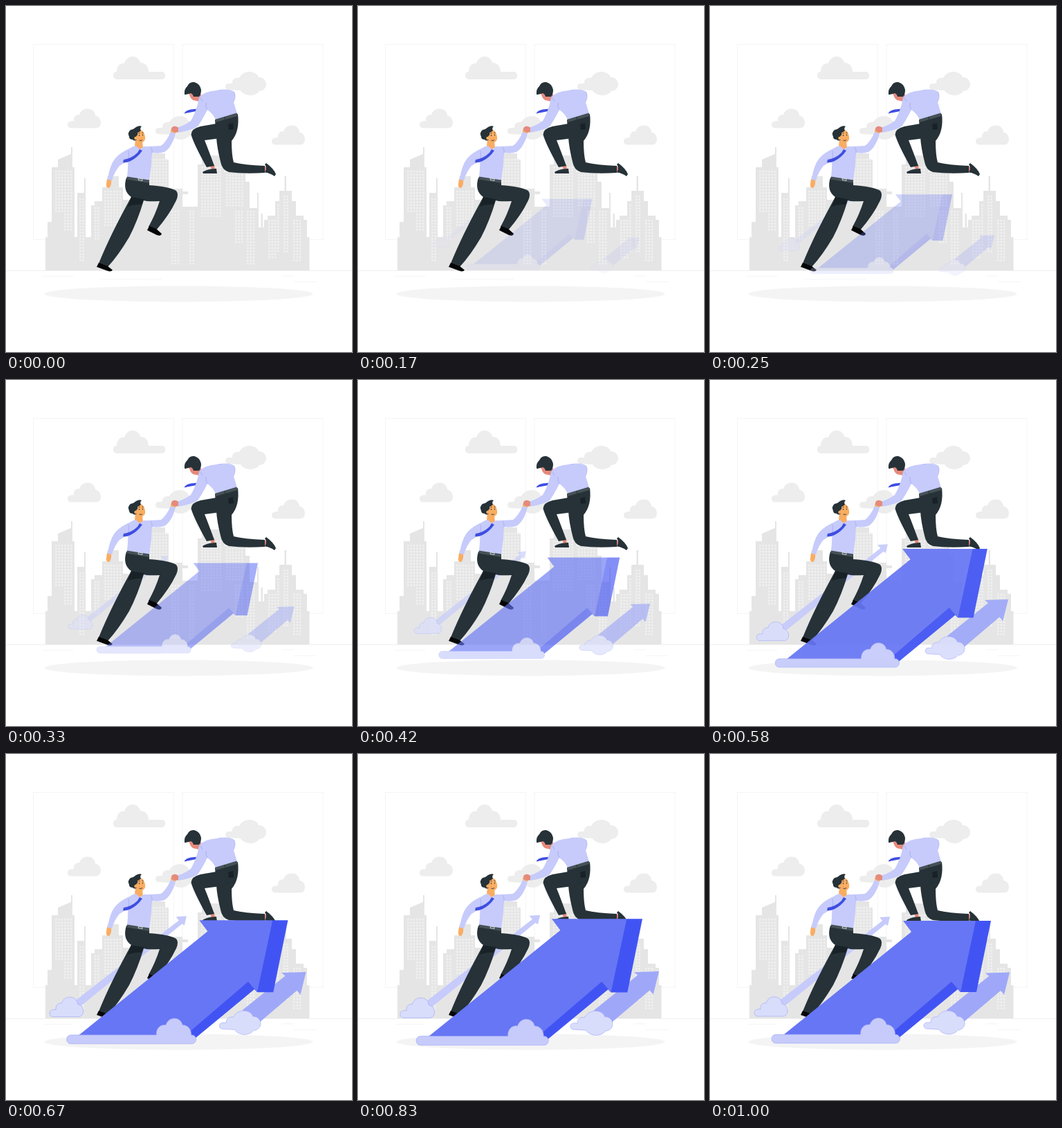
These frames come from a looping animation (500x500 px, 1040 ms). An HTML page with a canvas:

```html
<!DOCTYPE html>
<html lang="en">
<head>
<meta charset="utf-8">
<title>Helping hand</title>
<style>
html, body { margin: 0; width: 100%; height: 100%; overflow: hidden; background: #fff; }
canvas { display: block; width: 100vw; height: 100vh; }
</style>
</head>
<body>
<canvas id="stage" width="500" height="500"></canvas>
<script>
const SIZE = 500, LOOP = 1040, FPS = 24;
const SKIN = "#f9ad62", ROSE = "#e58a7b", DARK = "#263238", SHADE = "#182126";
const BLACK = "#050607", BELT = "#465157", SHIRT = "#c6cbfb", TIE = "#3f4ee0";
const FOLD = "#969ff0", EDGE = "#9aa5f8", MIST = "#d9ddfc", GREY = "#ededed";
const FRONT = "#6776f4", SIDE = "#4154f3", PALE = "#9fa8f8";

const stage = document.getElementById("stage").getContext("2d");
const sheet = document.createElement("canvas");
sheet.width = sheet.height = SIZE;
const layer = sheet.getContext("2d");
let c = stage;

// Each step is a line [x, y], a quadratic or a cubic curve
function trace(x, y, steps) {
  c.beginPath();
  c.moveTo(x, y);
  for (const s of steps) {
    if (s.length === 2) c.lineTo(...s);
    else if (s.length === 4) c.quadraticCurveTo(...s);
    else c.bezierCurveTo(...s);
  }
}

function shape(fill, x, y, ...steps) {
  trace(x, y, steps);
  c.closePath();
  c.fillStyle = fill;
  c.fill();
}

function line(color, width, x, y, ...steps) {
  trace(x, y, steps);
  c.strokeStyle = color;
  c.lineWidth = width;
  c.stroke();
}

function oval(fill, x, y, rx, ry) {
  c.beginPath();
  c.ellipse(x, y, rx, ry, 0, 0, Math.PI * 2);
  c.fillStyle = fill;
  c.fill();
}

function edge(color) {
  c.strokeStyle = color;
  c.lineWidth = .6;
  c.stroke();
}

function at(x, y, paint) {
  c.save();
  c.translate(x, y);
  paint();
  c.restore();
}

function smallCloud(x, y, fill, rim) {
  at(x, y, () => {
    shape(fill, 5, 28, [-1.7, 28, -1.7, 18, 5, 18], [7, 17, 9, 18],
      [8, 11, 13, 8, 17, 9], [19, 2, 24, 0, 29, 0], [36, 0, 40, 5, 40, 10],
      [45, 11, 48, 15, 48, 20], [48, 25, 45, 28, 41, 28]);
    if (rim) edge(rim);
  });
}

function largeCloud(x, y, fill, rim) {
  at(x, y, () => {
    shape(fill, 4.5, 26, [-1.5, 26, -1.5, 17, 4.5, 17], [10, 17],
      [9, 11, 15, 8, 20, 9], [23, 3, 29, 0, 35, 0], [42, 0, 47, 4, 48, 8],
      [55, 8, 59, 13, 59, 18], [59, 24, 54, 28, 49, 28],
      [46, 32, 41, 34, 36, 34], [30, 34, 24, 31, 22, 27]);
    if (rim) edge(rim);
  });
}

function backdrop() {
  c.strokeStyle = "#f3f3f3";
  c.lineWidth = .8;
  c.strokeRect(39.5, 55.5, 203, 282);
  c.strokeRect(255, 55.5, 203, 282);
  line("#ebebeb", .8, 0, 382.5, [500, 382.5]);
  line("#f3f3f3", .8, 53, 390.5, [97, 390.5]);
  line("#f3f3f3", .8, 136, 395, [225, 395]);
  line("#f3f3f3", .8, 399, 390, [416, 390]);
  line("#f3f3f3", .8, 416, 398.5, [448, 398.5]);
  oval("#f4f4f4", 249.5, 416, 194, 11.5);

  shape(GREY, 161, 106, [153, 106, 153, 95, 160, 95], [160, 87, 165, 82, 171, 83],
    [173, 76, 178, 73, 183, 73], [189, 73, 193, 77, 194, 82],
    [201, 82, 206, 87, 206, 95], [225, 95], [232, 95, 232, 106, 225, 106]);
  smallCloud(89, 148.5, GREY);
  smallCloud(384, 172.5, GREY);
  largeCloud(317, 95, GREY);
  largeCloud(216, 159, GREY);
}

// Skyline: [left, right, top], all standing on the floor line
const towers = [
  [57, 438.5, 334], [60, 99, 312], [66, 99, 233], [94, 96, 204],
  [103, 115, 270], [113, 115, 249], [123, 169, 288], [128, 169, 282],
  [139, 169, 262], [146, 163, 246], [169, 203, 280], [203, 235, 222],
  [208, 230, 213], [235, 255, 264], [235, 277, 290], [277, 316, 229],
  [283, 312, 216], [316, 346, 240], [328, 345, 229], [345, 352, 254],
  [352, 365, 292], [363, 365, 270], [365, 373, 320], [368.5, 371, 300],
  [373, 435, 309], [378, 430, 303], [389, 419, 282], [395, 413, 267],
  [402.5, 405, 246]
];

// Window grids: [left, top, columns, rows]
const grids = [
  [70, 237, 6, 14], [83, 299, 3, 6], [105, 277, 2, 21], [127, 290, 2, 11],
  [141, 266, 6, 12], [207, 220, 6, 10], [238, 295, 3, 18], [264, 295, 2, 18],
  [281, 231, 7, 17], [317, 242, 6, 11], [330, 295, 3, 11], [347, 295, 3, 18],
  [378, 308, 3, 13], [391, 286, 1, 16], [400, 273, 2, 19], [414, 308, 3, 14]
];

function city() {
  const pitch = 4.4;
  c.fillStyle = "#e5e5e5";
  for (const [l, r, top] of towers) c.fillRect(l, top, r - l, 382 - top);
  shape("#e5e5e5", 75, 234, [75, 222], [96, 213], [96, 234]);
  c.fillRect(254, 268, 9, 4);
  c.fillStyle = "#f0f0f0";
  for (const [x, y, cols, rows] of grids)
    for (let i = 0; i < cols * rows; i++)
      c.fillRect(x + .9 + i % cols * pitch, y + .9 + Math.floor(i / cols) * pitch, 2.7, 2.7);
}

function climber() {
  // hand, arm, neck
  shape(SKIN, 146, 250, [152, 251], [153, 259, 149, 263], [144, 263, 145, 257]);
  shape(SHIRT, 181, 205, [160, 213, 153, 228], [148, 240, 147, 251], [153, 252],
    [157, 239, 164, 231], [179, 222]);
  shape(SKIN, 187, 192, [197, 195], [198, 205], [190, 208], [186, 203]);

  // shirt and tie
  shape(SHIRT, 176, 208, [183, 202, 188, 202], [193, 207], [199, 203],
    [208, 203, 224, 202], [232, 196, 238, 182], [245, 184], [240, 204, 229, 211],
    [220, 214, 211, 212], [210, 230], [207, 252], [175, 247], [177, 230, 176, 208]);
  line(FOLD, .6, 177, 209, [179, 217, 176, 224]);
  line(FOLD, .6, 209, 204, [212, 208, 211, 213]);
  shape(TIE, 193, 207, [197, 209], [190, 219, 180, 224], [173, 227, 169, 226],
    [170, 222], [182, 220, 190, 212]);

  // head
  shape(SKIN, 186, 184, [190, 178, 197, 180], [202, 186, 201, 193],
    [198, 199, 192, 198], [186, 195, 186, 184]);
  shape(DARK, 178, 189, [175, 183, 180, 179], [185, 178, 188, 175],
    [193, 172, 196, 174], [193, 176, 195, 180], [192, 183, 190, 183],
    [191, 187, 188, 188], [189, 193], [186, 196, 183, 193], [178, 193, 178, 189]);
  oval(SKIN, 187.5, 191, 2.2, 2.2);
  oval(DARK, 192.5, 187, .6, .9);
  oval(DARK, 197.5, 186.5, .6, .9);
  line(DARK, .9, 191.5, 184, [193.5, 183.5]);
  line(DARK, .9, 196.5, 183, [198.5, 183.5]);
  line(DARK, .9, 192.5, 194, [195, 195.5, 197, 193.5]);
  shape(SKIN, 238, 182, [238, 176, 243, 175], [247, 178], [245, 184]);

  // trousers, belt, shoes
  shape(DARK, 174, 248, [207, 252], [207, 259], [236, 261, 246, 267],
    [250, 272, 246, 281], [236, 302, 217, 324], [206, 319], [216, 301, 222, 282],
    [204, 283, 199, 281], [190, 311, 178, 334], [162, 361, 147, 377], [134, 372],
    [151, 330, 181, 276], [168, 267, 174, 248]);
  shape(SHADE, 181, 276, [190, 278, 199, 279], [196, 287], [187, 286, 176, 290]);
  shape(BELT, 175, 246.5, [207, 251.5], [207, 256], [174.5, 250.5]);
  line("#eee", .8, 191.5, 249, [197, 250], [197, 252.5], [191, 251.5], [191.5, 249]);
  shape(BLACK, 134, 371, [147, 376], [154, 381.5], [152, 385, 146, 382.5], [131, 377]);
  shape(BLACK, 207, 318, [217, 322], [225, 329], [224, 333, 218, 331], [204, 324]);
}

function helper() {
  // far arm
  shape(SHIRT, 305, 122, [325, 120, 330, 125], [333, 133, 326, 143], [318, 137]);
  line(FOLD, .6, 306, 122, [325, 119, 330, 125], [333, 133, 327, 142]);
  line(FOLD, .6, 316, 130, [323, 132, 327, 139]);

  // head and tie
  shape(ROSE, 264, 126, [279, 124], [283, 130], [279, 138], [270, 136], [267, 133]);
  shape(DARK, 258, 128, [257, 120, 262, 116], [265, 109, 272, 110],
    [280, 112, 282, 121], [282, 128, 279, 131], [271, 131], [270, 127, 267, 126],
    [261, 128, 258, 128]);
  shape(TIE, 277, 148.5, [267, 149.5], [259, 151, 257.5, 155.5], [262, 154.5], [275, 152]);

  // shirt and near arm
  shape(SHIRT, 279, 132, [287, 123, 305, 122], [323, 124, 330, 142], [334, 156],
    [303, 165], [300, 156, 291, 150], [284, 164, 277, 174], [267, 180, 249, 183],
    [247, 176], [259, 172, 267, 166], [273, 156, 277, 142]);
  line(FOLD, .6, 291, 150, [288, 146, 289, 140]);
  line(FOLD, .6, 279, 132, [283, 134, 284, 138]);
  shape(ROSE, 249, 176, [249, 182], [244, 184, 240, 181], [237, 176, 242, 174],
    [246, 173, 249, 176]);

  // legs
  shape(ROSE, 295, 230, [301, 229], [302, 237], [297, 237]);
  shape(ROSE, 373, 232, [379, 232], [378, 240], [373, 240]);
  shape(DARK, 304, 170, [281, 174], [268, 177, 267.5, 186], [272, 201, 290, 233],
    [301, 231], [293, 209, 287, 194], [310, 191]);
  shape(DARK, 302, 165, [335, 156], [338, 181, 326, 195], [326, 215, 329, 226],
    [345, 230, 374, 231], [374, 241], [345, 243, 322, 240], [312, 237, 310, 225],
    [305, 205, 304, 190]);
  shape(SHADE, 321, 171, [328, 169], [329, 178], [322, 179]);
  shape(BELT, 302, 164, [333.5, 154.5], [334.5, 159], [303, 168]);
  line(DARK, 1, 316, 160, [317, 164]);
  shape(DARK, 284, 240, [290, 236, 298, 235.5], [304, 235], [305, 242], [285, 242]);
  shape(DARK, 376, 227, [387, 235, 390, 243], [388, 246], [381, 241, 374, 240.5],
    [378, 234, 374, 229]);
}

function leftArrow() {
  shape(SHIRT, 98, 358, [249, 241], [245, 236], [260, 235], [257, 248],
    [253.5, 246], [107, 365]);
  smallCloud(64, 351, MIST, EDGE);
}

function rightArrow() {
  shape(PALE, 342, 370, [403, 321], [398, 316.5], [433, 315.5], [425, 348],
    [420, 342], [367, 387], [350, 392]);
  largeCloud(309, 371, MIST, EDGE);
}

function mainArrow() {
  shape(SIDE, 384, 241, [406, 241], [385, 344], [362, 344], [358, 340],
    [272, 411], [250, 408], [349, 325]);
  shape(FRONT, 106, 406, [291, 257], [279, 241], [384, 241], [362, 344],
    [349, 329], [259, 406]);
  shape(SHIRT, 95.5, 418, [87, 418, 87, 405.3, 95.5, 405.3], [217.5, 405.3],
    [217, 396, 223, 390, 231, 391], [233, 385, 238, 381.5, 243, 381.5],
    [250, 381.5, 254, 386, 255, 391], [262, 391, 268, 397, 267.5, 405.3],
    [268, 405.3], [276.5, 405.3, 276.5, 418, 268, 418]);
  edge(EDGE);
}

const bez = (u, a, b) => 3 * (1 - u) * (1 - u) * u * a + 3 * (1 - u) * u * u * b + u * u * u;

function ease(x) {
  if (x >= 1) return 1;
  let lo = 0, hi = 1;
  for (let i = 0; i < 30; i++) {
    const mid = (lo + hi) / 2;
    if (bez(mid, .36, .5) < x) lo = mid; else hi = mid;
  }
  return bez(lo, -.01, 1.38);
}

// Fade and zoom a group about its centre
function zoom(paint, x, y, p) {
  if (p <= 0) return;
  const s = .5 + p / 2;
  layer.clearRect(0, 0, SIZE, SIZE);
  c = layer;
  at(x, y, () => {
    c.scale(s, s);
    c.translate(-x, -y);
    paint();
  });
  c = stage;
  c.globalAlpha = Math.min(1, p);
  c.drawImage(sheet, 0, 0);
  c.globalAlpha = 1;
}

// Motion advances at 24 steps per second, on a 10 ms clock
function stepAt(ms) {
  let n = 0;
  while (Math.round((n + 1) * 100 / FPS) * 10 <= ms) n++;
  return Math.min(n, FPS);
}

function draw(n) {
  const p = n < 2 ? 0 : ease(n / FPS + .036);
  c.fillStyle = "#fff";
  c.fillRect(0, 0, SIZE, SIZE);
  backdrop();
  city();
  zoom(leftArrow, 162, 307, p);
  climber();
  helper();
  zoom(rightArrow, 371, 360, p);
  zoom(mainArrow, 247.5, 329.5, p);
}

const start = performance.now();
let shown = -1;
function tick() {
  const n = stepAt((performance.now() - start) % LOOP);
  if (n !== shown) draw(shown = n);
  requestAnimationFrame(tick);
}
tick();
</script>
</body>
</html>
```
